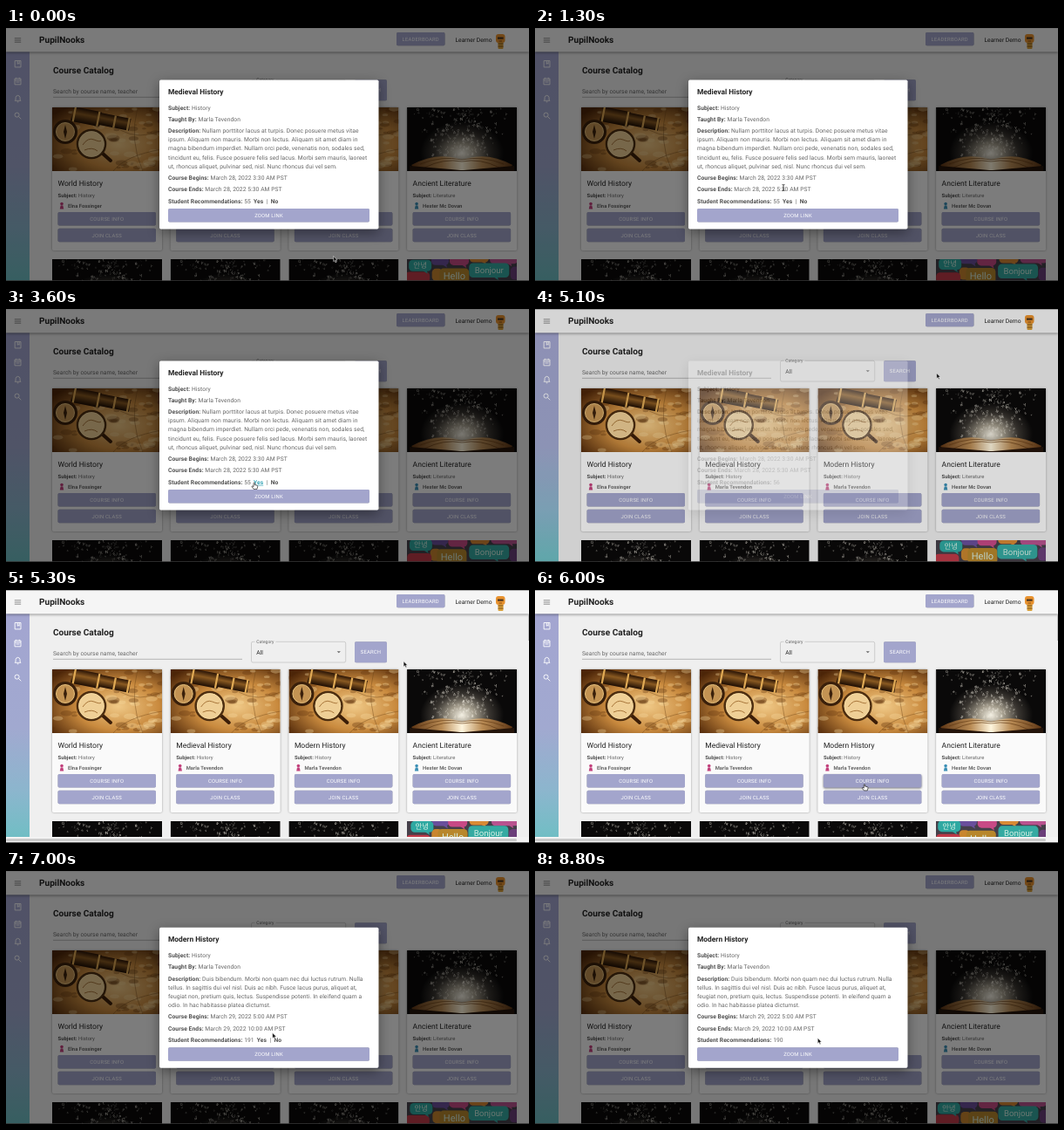
An HTML page that plays this animation: 600 by 290 pixels, repeating every 8.9 s.

```html
<!DOCTYPE html>
<html lang="en">
<head>
<meta charset="utf-8">
<title>Course Catalog</title>
<style>
  html, body { margin: 0; width: 100%; height: 100%; overflow: hidden; background: #efefef; }
  svg { display: block; }
  text { font-family: Roboto, sans-serif; fill: #222; text-rendering: geometricPrecision; white-space: pre; }
  .b { font-weight: 700; }
  .grey, .grey tspan { fill: #666; }
  .grey .b { fill: #505050; }
  .body { font-size: 6.72px; letter-spacing: .063px; }
  .small { font-size: 5.88px; letter-spacing: .04px; }
  .btn { fill: #a3a5cc; filter: drop-shadow(0 .7px .6px rgba(0,0,0,.3)); }
  .btn.hot { fill: #9c9ec5; filter: drop-shadow(0 1.2px 1.1px rgba(0,0,0,.5)); }
  .cap { font-size: 5.88px; letter-spacing: .2px; fill: #fff; text-anchor: middle; }
  .card { filter: drop-shadow(0 .6px .8px rgba(0,0,0,.35)); }
  .bar { filter: drop-shadow(0 1px 1.4px rgba(0,0,0,.4)); }
  .modal { filter: drop-shadow(0 4px 7px rgba(0,0,0,.4)); }
  .icon { fill: none; stroke: #fff; stroke-width: .9; }
  .grey tspan.hover { fill: #3aa6b8; text-decoration: underline; }
</style>
</head>
<body>
<svg id="stage" width="600" height="290" viewBox="0 0 600 290">
  <defs>
    <linearGradient id="side" x1="0" y1="0" x2="0" y2="1">
      <stop offset="0" stop-color="#a3a5d0"/><stop offset=".5" stop-color="#a1a9d0"/>
      <stop offset=".78" stop-color="#8bb6cd"/><stop offset="1" stop-color="#6dbfc3"/>
    </linearGradient>
    <radialGradient id="parchment" cx=".6" cy=".58" r=".75">
      <stop offset="0" stop-color="#f0c987"/><stop offset=".5" stop-color="#c98a3e"/><stop offset="1" stop-color="#4c2508"/>
    </radialGradient>
    <radialGradient id="glow" cx=".5" cy=".72" r=".5" gradientTransform="translate(.12 0) scale(.76 1)">
      <stop offset="0" stop-color="#f1ede0"/><stop offset=".3" stop-color="#a39c8c"/>
      <stop offset=".65" stop-color="#3a3631"/><stop offset="1" stop-color="#0a0909"/>
    </radialGradient>
    <linearGradient id="page" x1="0" x2="1">
      <stop offset="0" stop-color="#5d3514"/><stop offset=".3" stop-color="#b98b54"/><stop offset=".5" stop-color="#fff6de"/>
      <stop offset=".7" stop-color="#b98b54"/><stop offset="1" stop-color="#5d3514"/>
    </linearGradient>
    <linearGradient id="tube" x1="0" y1="0" x2="0" y2="1">
      <stop offset="0" stop-color="#2a1405"/><stop offset=".4" stop-color="#8a5a22"/><stop offset="1" stop-color="#1d0d03"/>
    </linearGradient>
    <symbol id="maps" viewBox="0 0 126 73">
      <rect width="126" height="73" fill="url(#parchment)"/>
      <g id="stains"></g>
      <path d="M70 73Q84 55 126 48M78 26Q100 38 126 26M98 0Q88 38 104 73" fill="none" stroke="#6d4316" stroke-width=".7" opacity=".6"/>
      <g transform="translate(24 -1) rotate(11)">
        <rect width="34" height="17" rx="2" fill="url(#tube)"/>
        <rect x="32" y="1" width="36" height="14" fill="url(#tube)"/>
        <path d="M3 0v17M31 0v17M50 1v14M66 0v16" stroke="#e0aa55" stroke-width="2.2"/>
      </g>
      <circle cx="15" cy="28" r="14" fill="#3a200b"/>
      <circle cx="15" cy="28" r="10.5" fill="#c39353" stroke="#e8c17c" stroke-width="1"/>
      <path d="M15 20l2 8-2 8-2-8z" fill="#3a200b"/>
      <path d="M58 53l9 8" stroke="#3c1e08" stroke-width="4" stroke-linecap="round"/>
      <circle cx="45" cy="42" r="16" fill="#efcf96" stroke="#4d2e10" stroke-width="2.6"/>
      <circle cx="45" cy="42" r="14.4" fill="none" stroke="#f6dca4" stroke-width=".8"/>
      <path d="M35 43q6-9 13-6t8 1M37 49q9-4 15 1" fill="none" stroke="#a8763a" stroke-width="1"/>
    </symbol>
    <symbol id="letters" viewBox="0 0 126 73">
      <rect width="126" height="73" fill="url(#glow)"/>
      <g id="glyphs"></g>
      <path d="M5 66Q34 50 63 60Q92 50 121 66L116 73H10z" fill="url(#page)"/>
      <path d="M63 60Q40 55 15 65M63 60Q86 55 111 65M63 62Q42 58 20 69M63 62Q84 58 106 69" fill="none" stroke="#5b330e" stroke-width=".6"/>
      <path d="M3 67l58 5h4l58-5v6H3z" fill="#24140a"/>
    </symbol>
    <clipPath id="chatClip"><rect x="460" y="265" width="126" height="25"/></clipPath>
  </defs>
  <g id="app"></g>
  <g id="scroll">
    <rect y="283" width="600" height="7" fill="#f3f3f3"/>
    <rect y="285" width="586" height="3" rx="1.5" fill="#cacaca"/>
    <rect x="599" y="28" width="1" height="30" fill="#bdbdbd"/>
  </g>
  <rect id="dim" width="600" height="290"/>
  <g id="modals"></g>
  <path d="M0 .4h600" stroke="#666" stroke-width=".8" opacity=".7"/>
  <rect y="289.2" width="600" height=".8" fill="#333"/>
  <g id="cursor">
    <path id="arrow" d="M0 0V6.2L1.5 4.9L2.5 7.2L3.6 6.7L2.6 4.5H4.5Z" fill="#111" stroke="#fff" stroke-width=".5"/>
    <path id="beam" d="M-1.5-3.6Q0-3.6 0-2.6Q0-3.6 1.5-3.6M0-2.6V2.6M-1.5 3.6Q0 3.6 0 2.6Q0 3.6 1.5 3.6" fill="none" stroke="#222" stroke-width=".8"/>
    <path id="hand" d="M-.7 .5Q0-.5 .7 .5V2.6L3.4 3.2Q4.2 3.5 4 4.6L3.3 7.4H-.6L-2.7 4.6Q-2.6 3.6-1.6 4L-.7 4.7Z" fill="#fff" stroke="#111" stroke-width=".65"/>
  </g>
</svg>
<script>
const LOOP = 8900, STEP = 100;
const $ = id => document.getElementById(id);

let seed = 7;
const rnd = () => (seed = seed * 16807 % 2147483647) / 2147483647;

const text = (x, y, size, str, cls = '') =>
  `<text x="${x}" y="${y}" style="font-size:${size}px" class="${cls}">${str}</text>`;
const line = (x, y, cls, label, value) =>
  `<text x="${x}" y="${y}" class="grey ${cls}"><tspan class="b">${label}</tspan> ${value}</text>`;
const button = (x, y, w, h, label, id = '') =>
  `<rect ${id && `id="${id}"`} class="btn" x="${x}" y="${y}" width="${w}" height="${h}" rx="1.7"/>
   <text class="cap" x="${x + w / 2}" y="${y + h / 2 + 2.1}">${label}</text>`;

// Picture textures
$('stains').innerHTML = Array.from({ length: 80 }, () => {
  const x = rnd() * 126, y = rnd() * 73, r = 1 + rnd() * 4;
  const fill = rnd() > .5 ? '#f9dda4' : '#5c300b';
  return `<ellipse cx="${x}" cy="${y}" rx="${r * 1.5}" ry="${r * .7}" fill="${fill}" opacity=".33"/>`;
}).join('');
$('glyphs').innerHTML = Array.from({ length: 230 }, () => {
  const y = 1 + rnd() * 56;
  const x = 63 + (rnd() + rnd() - 1) * (62 - y * .4);
  const ch = String.fromCharCode(65 + rnd() * 26 | 0);
  return `<text transform="translate(${x} ${y}) rotate(${rnd() * 80 - 40})"
    style="font-size:${2.2 + rnd() * 2.6}px;fill:#f3eee2" opacity="${.3 + rnd() * .7}">${rnd() > .5 ? ch : ch.toLowerCase()}</text>`;
}).join('');

// Page
const tutors = { a: ['Elna Fossinger', '#c2417c'], b: ['Marla Tevendon', '#c2417c'], c: ['Hester Mc Dovan', '#3b8fb5'] };
const courses = [
  ['World History', 'History', 'a', 'maps'],
  ['Medieval History', 'History', 'b', 'maps'],
  ['Modern History', 'History', 'b', 'maps'],
  ['Ancient Literature', 'Literature', 'c', 'letters']
];
const cardX = i => 53 + i * 135.7;

function card([title, subject, tutor, pic], i) {
  const x = cardX(i), [name, tint] = tutors[tutor];
  return `<rect class="card" x="${x}" y="91" width="126" height="164" rx="1.7" fill="#fafafa"/>
    <use href="#${pic}" x="${x}" y="91" width="126" height="73"/>
    ${text(x + 6.5, 181, 8.55, title)}
    ${line(x + 6.5, 193.5, 'small', 'Subject:', subject)}
    <g fill="${tint}"><circle cx="${x + 11}" cy="201.6" r="1.8"/><path d="M${x + 8.8} 207.5l.8-4h2.8l.8 4z"/></g>
    ${text(x + 18, 205.6, 5.88, name, 'b grey')}
    ${button(x + 6.5, 211, 112.5, 15.5, 'COURSE INFO', i === 2 ? 'info' : '')}
    ${button(x + 6.5, 229.7, 112.5, 15.5, 'JOIN CLASS')}`;
}

// Speech bubbles: x, y, width, height, colour, label, font size, drift
const bubbles = [
  [488, 261, 20, 10, '#6a4f9c', '', 0, 1.2], [508, 261, 22, 11, '#c84a86', '', 0, 1],
  [532, 261, 22, 8, '#d98a35', '', 0, .8], [556, 261, 32, 9, '#b9538f', '', 0, 1],
  [488, 275, 12, 14, '#c9862f', '', 0, 1.4], [578, 274, 14, 15, '#6b3f7a', '', 0, 1],
  [459, 280, 28, 12, '#c03a48', '', 0, 1.2],
  [463, 265, 26, 13, '#2fa9a2', '안녕', 8.5, 1.4],
  [496, 275, 34, 18, '#b8872c', 'Hello', 11, 1.6],
  [531, 270, 46, 16.5, '#35aaa2', 'Bonjour', 9.6, .7]
];
const bubble = ([x, y, w, h, fill, label, size]) =>
  `<g class="bubble"><rect x="${x}" y="${y}" width="${w}" height="${h}" rx="4.5" fill="${fill}"/>
   <path d="M${x + w * .6} ${y + h - 1}h5l1 4z" fill="${fill}"/>
   <text x="${x + w / 2}" y="${y + h / 2 + size * .35}" text-anchor="middle"
     style="font-family:Roboto,'Noto Sans CJK KR','Noto Sans CJK',sans-serif;font-size:${size}px;fill:#d5f0e4">${label}</text></g>`;

$('app').innerHTML = `
  <rect width="600" height="290" fill="#efefef"/>
  <rect y="27" width="27" height="263" fill="url(#side)"/>
  <g class="icon">
    <path d="M10.2 37.5h6.8v7.4h-6.8zM13.2 38v3.2l1-.8 1 .8v-3.200"/>
    <path d="M10 58h7v6.8h-7zM10 60h7M11.7 56.8v1.5M15.3 56.8v1.5M11.5 62h4"/>
    <path d="M10.2 83.3h6.8l-.9-1.2v-2.4q-.3-2.2-2.5-2.4-2.2.2-2.5 2.4v2.4zM12.8 84.8h1.6"/>
    <circle cx="12.6" cy="99.6" r="2.5"/><path d="M14.5 101.5l2.8 2.8"/>
  </g>
  <rect class="bar" width="600" height="27.300" fill="#f5f5f5"/>
  <path d="M9.8 11.8h7.4M9.8 14h7.4M9.8 16.2h7.4" stroke="#777" stroke-width=".8"/>
  ${text(38, 17.3, 10.08, 'PupilNooks', 'b')}
  ${button(448, 5, 55.5, 15.3, 'LEADERBOARD')}
  ${text(515.5, 16.4, 6.72, 'Learner Demo')}
  <rect x="562" y="7" width="10.500" height="10" rx="3" fill="#e8922f"/>
  <path d="M564 10.500h6.600v2.200H564z" fill="#4a3420"/>
  <rect x="564.500" y="16.500" width="6" height="7.500" rx="1" fill="#d9a13a"/>
  <path d="M565.500 15h3.600M564.500 18h6M564.500 21h6" stroke="#7d4a16" stroke-width=".9"/>
  ${text(54, 52.3, 10.08, 'Course Catalog', 'b')}
  ${text(54, 74.8, 6.72, 'Search by course name, teacher', 'body grey')}
  <path d="M54 79.3h217" stroke="#8a8a8a" stroke-width=".6"/>
  <path d="M285.5 59.3H283.2Q281.5 59.3 281.5 61V81.3Q281.5 83 283.2 83H388Q389.700 83 389.700 81.300V61Q389.700 59.300 388 59.300H309.500" fill="none" stroke="#b5b5b5" stroke-width=".6"/>
  ${text(287.3, 61, 5.04, 'Category', 'grey')}
  ${text(287.3, 73.6, 6.72, 'All')}
  <path d="M379.7 70.2h4.2l-2.1 2.1z" fill="#666"/>
  ${button(400, 59.3, 37, 24, 'SEARCH')}
  ${courses.map(card).join('')}
  ${[0, 1, 2].map(i => `<use href="#letters" x="${cardX(i)}" y="265" width="126" height="73"/>`).join('')}
  <g clip-path="url(#chatClip)"><rect x="460" y="265" width="126" height="25" fill="#45404a"/>${bubbles.map(bubble).join('')}</g>`;

// Dialogs
const dialogs = [
  { top: 59.5, title: 'Medieval History', day: 28, from: '3:30', to: '5:30', votes: 55, after: 56, x: [284, 298.6, 303.7],
    about: ['Nullam porttitor lacus at turpis. Donec posuere metus vitae',
      'ipsum. Aliquam non mauris. Morbi non lectus. Aliquam sit amet diam in',
      'magna bibendum imperdiet. Nullam orci pede, venenatis non, sodales sed,',
      'tincidunt eu, felis. Fusce posuere felis sed lacus. Morbi sem mauris, laoreet',
      'ut, rhoncus aliquet, pulvinar sed, nisl. Nunc rhoncus dui vel sem.'] },
  { top: 64.8, title: 'Modern History', day: 29, from: '5:00', to: '10:00', votes: 191, after: 190, x: [287.8, 302.5, 307.5],
    about: ['Duis bibendum. Morbi non quam nec dui luctus rutrum. Nulla',
      'tellus. In sagittis dui vel nisl. Duis ac nibh. Fusce lacus purus, aliquet at,',
      'feugiat non, pretium quis, lectus. Suspendisse potenti. In eleifend quam a',
      'odio. In hac habitasse platea dictumst.'] }
];

function dialog({ top, title, day, from, to, votes, x, about }, i) {
  const first = top + 60.8, last = first + (about.length - 1) * 10.08, rec = last + 40.2;
  const row = (y, label, value) => line(186, y, 'body', label, value);
  return `<g id="modal${i}" class="modal">
    <rect x="176" y="${top}" width="251.5" height="${rec + 29.7 - top}" rx="1.7" fill="#fff"/>
    ${text(186, top + 16.3, 8.4, title, 'b')}
    ${row(top + 34, 'Subject:', 'History')}
    ${row(top + 47.4, 'Taught By:', 'Marla Tevendon')}
    ${row(first, 'Description:', about[0])}
    ${about.slice(1).map((s, n) => text(186, first + (n + 1) * 10.08, 6.72, s, 'body grey')).join('')}
    ${row(last + 13.4, 'Course Begins:', `March ${day}, 2022 ${from} AM PST`)}
    ${row(last + 26.8, 'Course Ends:', `March ${day}, 2022 ${to} AM PST`)}
    ${row(rec, 'Student Recommendations:', `<tspan id="count${i}">${votes}</tspan>`)}
    <text id="vote${i}" y="${rec}" class="grey body"><tspan id="yes${i}" class="b" x="${x[0]}">Yes</tspan><tspan x="${x[1]}">|</tspan><tspan id="no${i}" class="b" x="${x[2]}">No</tspan></text>
    ${button(186, rec + 6.2, 231, 15.5, 'ZOOM LINK')}</g>`;
}
$('modals').innerHTML = dialogs.map(dialog).join('');

// Pointer path: time, x, y
const path = [
  [0, 375.7, 261.5], [200, 375.7, 261.5], [1100, 285, 181], [1300, 285, 183], [1500, 285, 183],
  [2100, 284.7, 199], [3900, 284.7, 199], [4700, 460.7, 73.5], [5200, 460.7, 73.5],
  [5900, 378, 222.5], [6500, 378, 222.5], [7000, 305.7, 185.5], [7300, 309, 193],
  [7800, 309, 193], [8300, 324.3, 191.5], [LOOP, 324.3, 191.5]
];
const shapes = [[900, 'arrow'], [2000, 'beam'], [4000, 'hand'], [5800, 'arrow'], [6500, 'hand'], [7200, 'arrow'], [7900, 'hand'], [LOOP, 'arrow']];

const clamp = v => Math.min(1, Math.max(0, v));
const ease = p => p * p * (3 - 2 * p);
const show = (el, on) => el.setAttribute('visibility', on ? 'visible' : 'hidden');
const bubbleEls = [...document.querySelectorAll('.bubble')];

function pointer(t) {
  const n = path.findIndex(k => k[0] > t), a = path[n - 1], b = path[n];
  const p = ease((t - a[0]) / (b[0] - a[0]));
  return [a[1] + (b[1] - a[1]) * p, a[2] + (b[2] - a[2]) * p];
}

function draw(t) {
  const fade = [1 - clamp((t - 4955) / 195), clamp((t - 6250) / 225)];
  const clicked = [t >= 3900, t >= 7700];
  fade.forEach((o, i) => {
    $('modal' + i).style.opacity = o;
    show($('modal' + i), o > 0);
    show($('vote' + i), o > 0 && !clicked[i]);
    $('count' + i).textContent = clicked[i] ? dialogs[i].after : dialogs[i].votes;
  });
  $('dim').style.opacity = Math.max(...fade) * .5;
  show($('scroll'), t >= 5200 && t < 6300);
  $('yes0').classList.toggle('hover', t >= 2000);
  $('no1').classList.toggle('hover', t >= 7200);
  $('info').classList.toggle('hot', t >= 5800 && t < 6400);

  const [x, y] = pointer(t), shape = shapes.find(s => t < s[0])[1];
  $('cursor').setAttribute('transform', `translate(${x} ${y})`);
  for (const id of ['arrow', 'beam', 'hand']) show($(id), id === shape);

  bubbleEls.forEach((el, i) => {
    const a = t / LOOP * Math.PI * 8 + i * 1.7, d = bubbles[i][7];
    el.setAttribute('transform', `translate(${d * Math.sin(a)} ${d * .7 * Math.cos(a)})`);
  });
}

const start = performance.now();
function tick() {
  const t = (performance.now() - start) % LOOP;
  draw(Math.floor(t / STEP) * STEP);
  requestAnimationFrame(tick);
}
tick();
</script>
</body>
</html>
```
